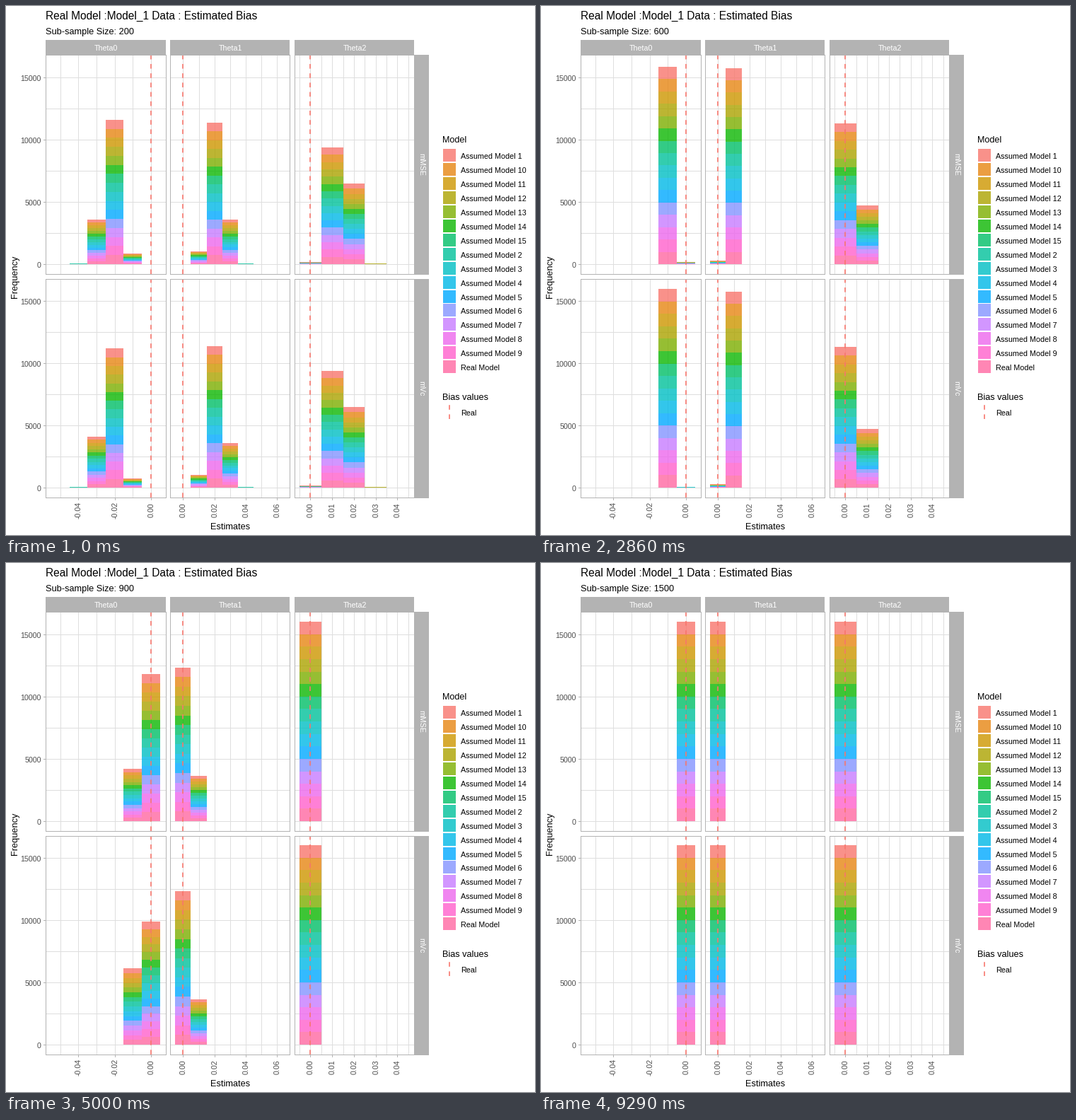
These frames come from a looping animation (748 px wide and 748 px high, 10000 ms). A matplotlib script:

```python
import math

import matplotlib.pyplot as plt
import numpy as np
from matplotlib.animation import FuncAnimation
from matplotlib.collections import PolyCollection
from matplotlib.patches import Rectangle

plt.rcParams["font.family"] = "Liberation Sans"

SIZE, DPI = 748, 100
PT = 72 / DPI
TICKS, TICK_MS = 100, 100
SIZES = range(200, 1501, 100)
TOTAL = 16000
GRID, EDGE, AXIS, DASH = "#DEDEDE", "#B3B3B3", "#4D4D4D", "#F8766D"

# Stacking order from the top of a bar to its base
HUES = ["#F8766D", "#E68613", "#CD9600", "#ABA300", "#7CAE00", "#0CB702",
        "#00BE67", "#00C19A", "#00BFC4", "#00B8E7", "#00A9FF", "#8494FF",
        "#C77CFF", "#ED68ED", "#FF61CC", "#FF68A1"]
MODELS = ["Assumed Model %d" % k for k in [1, *range(10, 16), *range(2, 10)]]
MODELS.append("Real Model")

# Horizontal units are 0.01; "law" gives, per row, the bias and its spread
# at the smallest size and the powers by which they shrink.
COLS = [
    dict(name="Theta0", x0=56, x1=226, zero=204.8, step=25.6, sign=-1,
         grid=range(-5, 1), ticks=range(-4, 1, 2),
         law=[(2.18, 0.42, 1.023, 1.41), (2.223, 0.426, 1.0115, 1.45)]),
    dict(name="Theta1", x0=232, x1=401, zero=250.4, step=22.15, sign=1,
         grid=range(7), ticks=range(0, 7, 2),
         law=[(2.167, 0.44, 1.0293, 1.41)] * 2),
    dict(name="Theta2", x0=408, x1=577, zero=430.4, step=30.75, sign=1,
         grid=np.arange(-0.5, 5, 0.5), ticks=range(5),
         law=[(1.408, 0.386, 1.015, 1.55)] * 2),
]
# Name, top, bottom and pixel of zero
ROWS = [("mMSE", 69, 379, 365), ("mVc", 386, 695, 681)]
Y_UNIT = 88.07 / 5000

fig = plt.figure(figsize=(SIZE / DPI, SIZE / DPI), dpi=DPI, facecolor="white")
ax = fig.add_axes([0, 0, 1, 1])
ax.set_xlim(0, SIZE)
ax.set_ylim(SIZE, 0)
ax.axis("off")


def box(x0, y0, x1, y1, color, z=1, alpha=None):
    ax.add_patch(Rectangle((x0, y0), x1 - x0, y1 - y0, fc=color, ec="none",
                           lw=0, alpha=alpha, antialiased=False, zorder=z))


def label(x, y, s, px, color="black", ha="left", va="baseline", rot=0):
    return ax.text(x, y, s, fontsize=px * PT, color=color, ha=ha, va=va,
                   rotation=rot, zorder=6)


def dashes(x, bottom, top):
    ax.plot([x, x], [bottom, top], color=DASH, lw=1.65 * PT, dashes=(4, 4),
            dash_capstyle="butt", zorder=4)


def frame(x0, y0, x1, y1):
    for edge in [(x0, y0, x1 + 1, y0 + 1), (x0, y1, x1 + 1, y1 + 1),
                 (x0, y0, x0 + 1, y1 + 1), (x1, y0, x1 + 1, y1 + 1)]:
        box(*edge, EDGE, 5)


def x_pos(col, v):
    return round(col["zero"] + v * col["step"])


def y_pos(base, n):
    return round(base - n * Y_UNIT)


def draw_panel(col, top, bottom, base):
    x0, x1 = col["x0"], col["x1"]
    for g in col["grid"]:
        x = x_pos(col, g)
        box(x, top, x + 1, bottom, GRID)
    for v in range(0, 15001, 2500):
        y = y_pos(base, v)
        box(x0, y, x1, y + 1, GRID)
    dashes(x_pos(col, 0), bottom, top)
    frame(x0, top, x1, bottom)


def draw_axes():
    for col in COLS:
        mid = (col["x0"] + col["x1"] + 1) / 2
        box(col["x0"], 48, col["x1"], 69, EDGE)
        label(mid, 63, col["name"], 10.6, "white", "center")
        for t in col["ticks"]:
            x = x_pos(col, t)
            box(x, 696, x + 1, 699, EDGE)
            label(x + 1, 713, "%.2f" % (t / 100), 10.6, AXIS, "center",
                  "center", 90)
    for name, top, bottom, base in ROWS:
        for col in COLS:
            draw_panel(col, top, bottom, base)
        box(577, top, 598, bottom + 1, EDGE)
        label(587, (top + bottom) / 2, name, 10.6, "white", "center",
              "center", -90)
        for v in range(0, 15001, 5000):
            y = y_pos(base, v)
            box(53, y, 56, y + 1, EDGE)
            label(50, y + 5, str(v), 10.6, AXIS, "right")
    label(317, 740, "Estimates", 12.8, ha="center")
    label(13.5, 383, "Frequency", 12.8, ha="center", va="center", rot=90)


def draw_legend():
    label(617, 193, "Model", 12.6)
    for i, (name, hue) in enumerate(zip(MODELS, HUES)):
        y = 202 + round(i * 19.95)
        box(618, y, 636, y + 18, hue, alpha=0.8)
        label(643, y + 14, name, 10.7)
    label(617, 557, "Bias values", 12.7)
    dashes(627, 584, 564)
    label(643, 579, "Real", 10.7)


def counts(law, n):
    """Expected count of normally spread estimates in each bin."""
    mean, sd, p, q = law
    shrink = SIZES[0] / n
    mean, sd = mean * shrink ** p, sd * shrink ** q
    below = [0.5 + 0.5 * math.erf((k - 0.5 - mean) / sd / math.sqrt(2))
             for k in range(7)]
    return TOTAL * np.diff(below)


def bar(col, base, k, n):
    """Sixteen equal slices on whole pixels, at least one pixel in all."""
    v = col["sign"] * k
    x0, x1 = x_pos(col, v - 0.5), x_pos(col, v + 0.5)
    height = n * Y_UNIT
    if round(height) < 1:
        parts = [(base - 1, base, HUES[7])]
    else:
        ys = np.round(base - height * np.linspace(1, 0, len(HUES) + 1))
        parts = zip(ys[:-1], ys[1:], HUES)
    for y0, y1, hue in parts:
        if y1 > y0:
            yield [(x0, y0), (x1, y0), (x1, y1), (x0, y1)], hue


draw_axes()
draw_legend()
label(56.5, 19, "Real Model :Model_1 Data : Estimated Bias", 15.5)
subtitle = label(56.5, 40, "", 12.8)
bars = PolyCollection([], linewidths=0, edgecolors="none", alpha=0.8,
                      antialiaseds=False, zorder=3)
ax.add_collection(bars, autolim=False)


def update(i):
    # Each size holds an equal share of the loop
    size = SIZES[int((i + 0.99) * len(SIZES) / TICKS)]
    parts = [part
             for r, row in enumerate(ROWS)
             for col in COLS
             for k, n in enumerate(counts(col["law"][r], size)) if n > 2
             for part in bar(col, row[3], k, n)]
    verts, hues = zip(*parts)
    bars.set_verts(verts)
    bars.set_facecolor(hues)
    subtitle.set_text("Sub-sample Size: %d" % size)
    return bars, subtitle


anim = FuncAnimation(fig, update, frames=TICKS, interval=TICK_MS,
                     repeat=True, repeat_delay=0)
plt.show()
```
